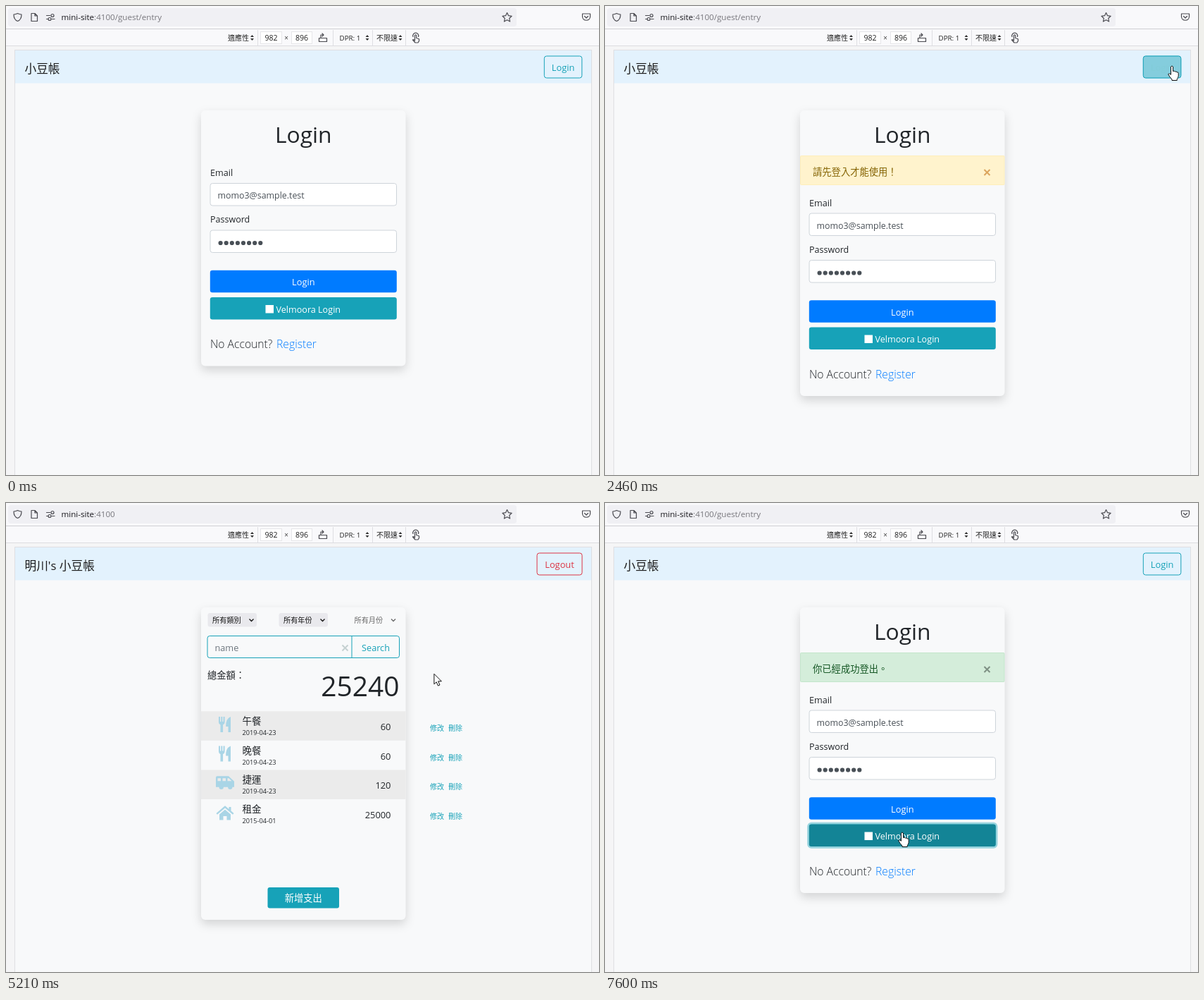
Recreate the animation shown at these times as an HTML page. Size 842 px wide and 665 px high, loop 8 s.

```html
<!DOCTYPE html>
<html lang="zh-Hant">
<head>
<meta charset="utf-8">
<title>Login flow</title>
<style>
html, body { margin: 0; width: 100%; height: 100%; overflow: hidden; background: #f5f5f6; }
svg { display: block; width: 842px; height: 665px; }
text { font-family: "Open Sans", "Noto Sans CJK TC", "Noto Sans CJK", sans-serif; white-space: pre; }
.card { fill: #f8f9fa; filter: drop-shadow(0 6.7px 6.7px rgba(0, 0, 0, .15)); }
.icon { fill: none; stroke: #4a4a50; stroke-width: 1.2; stroke-linejoin: round; stroke-linecap: round; }
.food { fill: #a9d5e6; }
</style>
</head>
<body>
<svg id="stage" viewBox="0 0 842 665"></svg>
<script>
const INK = '#212529', TEAL = '#17a2b8', BLUE = '#007bff', RED = '#dc3545', GREY = '#495057';
const LOOP = 8000;

const rect = (x, y, w, h, fill, o = {}) =>
  `<rect x="${x}" y="${y}" width="${w}" height="${h}" rx="${o.r || 0}" fill="${fill}" ` +
  `stroke="${o.line || 'none'}" stroke-width="${o.lw || 1}" ${o.attr || ''}/>`;
const text = (x, y, size, fill, s, o = {}) =>
  `<text x="${x}" y="${y}" font-size="${size}" fill="${fill}" text-anchor="${o.at || 'start'}" ` +
  `font-weight="${o.w || 400}">${s}</text>`;
const mid = (x, y, size, fill, s, o = {}) => text(x, y, size, fill, s, { ...o, at: 'middle' });
const end = (x, y, size, fill, s, o = {}) => text(x, y, size, fill, s, { ...o, at: 'end' });
const path = (d, o = 'class="icon"') => `<path d="${d}" ${o}/>`;
const group = (id, body, o = '') => `<g id="${id}" ${o}>${body}</g>`;
const vline = x => rect(x, 34, 1, 22, '#dedee2');
const ring = (id, x, y, w, h, color) =>
  group(id, rect(x - 1.3, y - 1.3, w + 2.6, h + 2.6, 'none', { r: 4.6, line: color, lw: 2.7 }));
const cross = (x, y, s, color) =>
  path(`M${x - s} ${y - s}l${2 * s} ${2 * s}m0 ${-2 * s}l${-2 * s} ${2 * s}`,
    `stroke="${color}" stroke-width="2" fill="none"`);
const sorter = x => path(`M${x - 2.5} 44l2.5-3 2.5 3zM${x - 2.5} 46l2.5 3 2.5-3z`, 'fill="#333"');

function browser() {
  return rect(0, 0, 842, 33, '#f9f9fb') + rect(3, 3, 722, 26, '#f0f0f4', { r: 4 }) +
    path('M16.5 10.5c2 1 3.500 1.300 5.500 1.500 0 5-1.500 8-5.500 9.500-4-1.500-5.500-4.500-5.500-9.500 2-.2 3.500-.5 5.500-1.500z') +
    path('M36 10.500h5l3.500 3.500v7.500h-8.500zM41 10.500v3.500h3.500') +
    path('M57.500 13.500h5M57.500 18.500h2M65 18.500h4') +
    '<circle cx="66" cy="13.500" r="2" class="icon"/><circle cx="62" cy="18.500" r="2" class="icon"/>' +
    path('M711.500 9.500l2 4.200 4.600.6-3.400 3.200.9 4.500-4.100-2.200-4.100 2.200.9-4.500-3.400-3.200 4.600-.6z') +
    path('M818.500 11h11v4c0 7-11 7-11 0zM821.500 14.500l2.500 2.500 2.500-2.500') +
    `<text x="78.500" y="20" font-size="11.600" fill="#15141a">mini-site<tspan fill="#77767c">:4100<tspan id="route">/guest/entry</tspan></tspan></text>` +
    rect(0, 32, 842, 1, '#cfcfd3') + rect(0, 33, 842, 24, '#f9f9fb') + rect(0, 56, 842, 1, '#dcdce0') +
    text(315, 49, 10, '#222', '適應性') + sorter(349.5) + vline(357) +
    rect(361.5, 36.5, 30, 17, '#fff', { line: '#e6e6e9' }) + mid(376.5, 49, 10.6, '#222', '982') +
    mid(398, 49, 10, '#444', '×') +
    rect(405.5, 36.5, 29, 17, '#fff', { line: '#e6e6e9' }) + mid(420, 49, 10.6, '#222', '896') +
    path('M444.500 45.500h11v5h-11zM447 45v-4h4M449 39l2 2-2 2') + vline(464) +
    text(473.5, 48.5, 9.8, '#222', 'DPR: 1') + sorter(513) + vline(520) +
    text(526, 49, 10, '#222', '不限速') + sorter(560) + vline(567) +
    path('M580.500 49v-7.500q1.200-1.500 2.200 0v4l3.800 1.200v3l-1.500 2.300h-4l-3.500-4q1-1 3 1M578 43.500a4 4 0 1 1 7.500 0');
}

function frame() {
  return rect(12.5, 62.5, 819, 620, '#f8f9fa', { line: '#dfdfe2' }) + rect(13, 63, 818, 46.5, '#e3f2fd');
}

function outline(id, x, w, color, label) {
  const box = fill => rect(x, 71, w, 31, fill, { r: 3.3, line: color });
  return box('none') + mid(x + w / 2, 92, 12.8, color, label) +
    group(id, box(color) + mid(x + w / 2, 92, 12.8, '#fff', label));
}

const alertBox = (id, fill, line, ink, mark, label) =>
  group(id, rect(277.5, 212.5, 289.5, 41, fill, { line, r: 1 }) +
    text(295, 240, 13.3, ink, label) + cross(542.5, 236, 4, mark));

const field = y => rect(290, y, 264.5, 31.5, '#fff', { r: 3.3, line: '#ced4da' });
const fieldFocus = (id, y, caret) => group(id,
  rect(290, y, 264.5, 31.5, 'none', { r: 3.3, line: '#80bdff' }) +
  rect(288.2, y - 1.8, 268.1, 35.1, 'none', { r: 5, line: 'rgba(0,123,255,.25)', lw: 2.7 }) +
  rect(caret, y + 7, 1, 17, '#222'));
const wide = (y, fill) => rect(289.8, y, 265, 31.5, fill, { r: 3.3 });

function loginPage() {
  const dots = Array.from({ length: 8 }, (_, i) =>
    `<circle cx="${304.6 + 8.1 * i}" cy="336" r="3.1" fill="${GREY}"/>`).join('');
  const form =
    text(290, 241, 12.6, INK, 'Email') + field(251.5) + text(300.5, 273, 12.4, GREY, 'momo3@sample.test') +
    fieldFocus('emailFocus', 251.5, 423) +
    text(290, 307, 12.5, INK, 'Password') + field(318) + dots + fieldFocus('passFocus', 318, 367) +
    wide(374.8, BLUE) + group('enterHover', wide(374.8, '#0069d9')) +
    ring('enterFocus', 289.8, 374.8, 265, 31.5, 'rgba(38,143,255,.5)') +
    mid(422.3, 396, 12.8, '#fff', 'Login') +
    wide(413, TEAL) + group('socialHover', wide(413, '#138496')) + group('socialDown', wide(413, '#117a8b')) +
    ring('socialFocus', 289.8, 413, 265, 31.5, 'rgba(58,176,195,.5)') +
    rect(368.5, 424, 11.5, 11.5, '#fff') + text(383.5, 434.5, 12.6, '#fff', 'Velmoora Login') +
    text(290, 485, 15.7, INK, 'No Account?', { w: 300 }) + text(384, 485, 15.7, BLUE, 'Register', { w: 300 });
  return group('login',
    text(26.5, 95, 16.7, '#1c1c1c', '小豆帳') + outline('navHover', 764.3, 53.5, TEAL, 'Login') +
    rect(277, 148, 290.5, 362.5, '', { r: 6, attr: 'id="card" class="card"' }) +
    mid(422.3, 194, 31.8, INK, 'Login') +
    alertBox('warn', '#fff3cd', '#ffeeba', '#856404', '#dba45c', '請先登入才能使用！') +
    alertBox('done', '#d4edda', '#c3e6cb', '#155724', '#7d8f83', '你已經成功登出。') +
    group('form', form));
}

const glyphs = {
  meal: path('M302 303h2v7h1.300v-7h2v7h1.300v-7h2v8q0 2.500-2.500 3.500v10.500h-3.600v-10.500q-2.500-1-2.500-3.500zM319 303v22h-3.500v-8h-3.300q-.5-11 6.800-14z', 'class="food"'),
  van: path('M300 304h16l8 7.500v8h-2.500a3.200 3.200 0 0 1-6.400 0h-6.200a3.200 3.200 0 0 1-6.400 0h-4.500v-13.500q0-2 2-2zM300.500 307v4h4.500v-4zM307.500 307v4h4.500v-4zM314.500 307v4h6l-4-4z', 'class="food" fill-rule="evenodd"'),
  home: path('M311 304.500l5.500 4.700v-3h3v5.600l4 3.400-1.500 1.700-11-9.300-11 9.300-1.500-1.700zM311 310l8 6.700v8h-5.500v-5.500h-5v5.500h-5.500v-8z', 'class="food"')
};

function entry([icon, name, date, sum], i) {
  return `<g transform="translate(0 ${41.6 * i})">` +
    (i % 2 ? '' : rect(277, 295.3, 290.5, 41.5, '#ebebeb')) + glyphs[icon] +
    text(335.5, 314, 13.5, INK, name) + text(335.5, 329, 9.2, INK, date) + end(546.5, 322, 12.9, INK, sum) +
    text(602, 323, 10, TEAL, '修改') + text(628, 323, 10, TEAL, '刪除') + '</g>';
}

function picker(x, label, ink, fill) {
  return rect(x, 156, 69.5, 19.5, fill, { r: 3.3 }) + text(x + 6.500, 170, 10.2, ink, label) +
    path(`M${x + 59} 164.500l3 3 3-3`, `fill="none" stroke="${ink}" stroke-width="1.300"`);
}

function ledgerPage() {
  const rows = [
    ['meal', '午餐', '2019-04-23', '60'],
    ['meal', '晚餐', '2019-04-23', '60'],
    ['van', '捷運', '2019-04-23', '120'],
    ['home', '租金', '2015-04-01', '25000']
  ];
  return group('ledger',
    text(26.5, 95, 16.7, '#1c1c1c', "明川's 小豆帳") + outline('outHover', 754, 64, RED, 'Logout') +
    ring('outFocus', 754, 71, 64, 31, 'rgba(220,53,69,.5)') +
    rect(277, 148, 290.5, 443, '', { r: 6, attr: 'class="card"' }) +
    picker(286.5, '所有類別', '#111', '#e9e9ed') + picker(387.5, '所有年份', '#111', '#e9e9ed') +
    picker(488, '所有月份', '#666', '#f8f9fa') +
    rect(286, 188.5, 272.5, 31, '#f8f9fa', { r: 3.3, line: TEAL }) + rect(490.5, 188.5, 1, 31, TEAL) +
    text(296.5, 210, 12.7, '#6c757d', 'name') + cross(481.5, 205.5, 4, '#c5d1d1') +
    mid(525, 210, 12.7, TEAL, 'Search') +
    text(286, 249, 13.3, INK, '總金額：') + end(558.5, 274, 38.9, INK, '25240') +
    rows.map(entry).join('') +
    rect(371.5, 545, 101.5, 29.5, TEAL, { r: 3 }) + mid(422.3, 565, 13.3, '#fff', '新增支出'));
}

const inked = 'fill="#fff" stroke="#111" stroke-width="1" stroke-linejoin="round"';
const pointers =
  group('arrow', path('M0 0v14.500l3.300-3 2.300 5.300 2.500-1.100-2.300-5.200h4.700z', inked)) +
  group('hand', path('M-1.500 1q1.500-2 3 0v6.500q2-1 2.800.6 2-.8 2.700.8 2-.6 2.200 1.400v4q-.5 2.500-2 4.500v1.700h-7.200v-1.500q-3.500-3.500-5.300-7.300 1.300-2.200 3.800.6z', inked)) +
  group('beam', path('M-3-6.500h2l1 1 1-1h2M-3 6.500h2l1-1 1 1h2M0-5.500v11', 'fill="none" stroke="#222" stroke-width="1.200"'));

document.getElementById('stage').innerHTML =
  rect(0, 0, 842, 665, '#f5f5f6') + browser() + frame() + loginPage() + ledgerPage() +
  group('status', rect(-1, 655.5, 45, 12, '#f9f9fb', { line: '#dddde0' })) + group('pointer', pointers);

// time, x, y, shape from then on
const track = [
  [330, 750, 636, 'arrow'], [700, 400, 330, 'arrow'], [1020, 60, 108, 'arrow'],
  [1090, 36, 84, 'hand'], [1160, 32, 74, 'hand'], [1290, 30, 72, 'hand'], [1430, 44, 77, 'hand'],
  [1560, 58, 81, 'hand'], [1660, 66, 88, 'arrow'], [2180, 816, 115, 'arrow'],
  [2390, 805, 88, 'hand'], [2460, 805, 85, 'hand'], [2680, 805, 85, 'arrow'],
  [3070, 572, 160, 'arrow'], [3250, 426, 264, 'beam'], [3430, 422, 268, 'beam'],
  [3500, 419, 290, 'arrow'], [3570, 416, 320, 'beam'], [3620, 416, 327, 'beam'],
  [3890, 416, 330, 'beam'], [3980, 418, 352, 'arrow'], [4120, 422, 376, 'hand'],
  [4300, 426, 388, 'hand'], [4450, 426, 388, 'arrow'], [5000, 426, 388, 'arrow'],
  [5420, 788, 98, 'hand'], [5490, 798, 76, 'hand'], [5900, 798, 76, 'arrow'],
  [6240, 798, 76, 'arrow'], [6640, 440, 396, 'arrow'], [6740, 424, 418, 'hand'],
  [7000, 423, 440, 'hand'], [7300, 422, 467, 'hand'], [LOOP, 422, 467, 'hand']
];

const el = id => document.getElementById(id);
const alpha = (id, v) => { el(id).style.opacity = v; };
const within = (t, a, b) => (t >= a && t < b ? 1 : 0);
const smooth = u => { u = Math.max(0, Math.min(1, u)); return u * u * (3 - 2 * u); };
const fade = (t, a, b) => smooth((t - a) / 150) * (1 - smooth((t - b) / 150));

function movePointer(t) {
  alpha('pointer', t >= track[0][0] ? 1 : 0);
  const next = Math.max(1, track.findIndex(k => k[0] > t));
  const [t0, x0, y0, shape] = track[next - 1], [t1, x1, y1] = track[next];
  const u = Math.max(0, (t - t0) / (t1 - t0));
  el('pointer').setAttribute('transform', `translate(${x0 + (x1 - x0) * u} ${y0 + (y1 - y0) * u})`);
  for (const s of ['arrow', 'hand', 'beam']) alpha(s, s === shape ? 1 : 0);
}

function draw(t) {
  const ledger = within(t, 4730, 6240), warn = within(t, 1430, 2660), done = within(t, 6240, LOOP);
  const shift = warn || done ? 42.5 : 0;
  alpha('login', 1 - ledger);
  alpha('ledger', ledger);
  alpha('warn', warn);
  alpha('done', done);
  el('form').setAttribute('transform', `translate(0 ${shift})`);
  el('card').setAttribute('height', 362.5 + shift);
  alpha('route', 1 - within(t, 4600, 6240));
  el('route').style.fillOpacity = 1 - within(t, 4600, 6240);
  alpha('status', within(t, 4600, 4730));
  alpha('navHover', t < 2660 ? fade(t, 2390, LOOP) : 0);
  alpha('emailFocus', fade(t, 3300, 3740));
  alpha('passFocus', fade(t, 3740, 4400));
  alpha('enterHover', Math.max(fade(t, 4120, 4900), fade(t, 6740, 7080)));
  alpha('enterFocus', fade(t, 4400, 4900));
  alpha('outHover', fade(t, 5400, LOOP));
  alpha('outFocus', fade(t, 5880, LOOP));
  alpha('socialHover', fade(t, 7130, LOOP));
  alpha('socialFocus', fade(t, 7310, LOOP));
  alpha('socialDown', fade(t, 7310, 7450));
  movePointer(t);
}

function tick() {
  draw(performance.now() % LOOP);
  requestAnimationFrame(tick);
}
tick();
</script>
</body>
</html>
```
